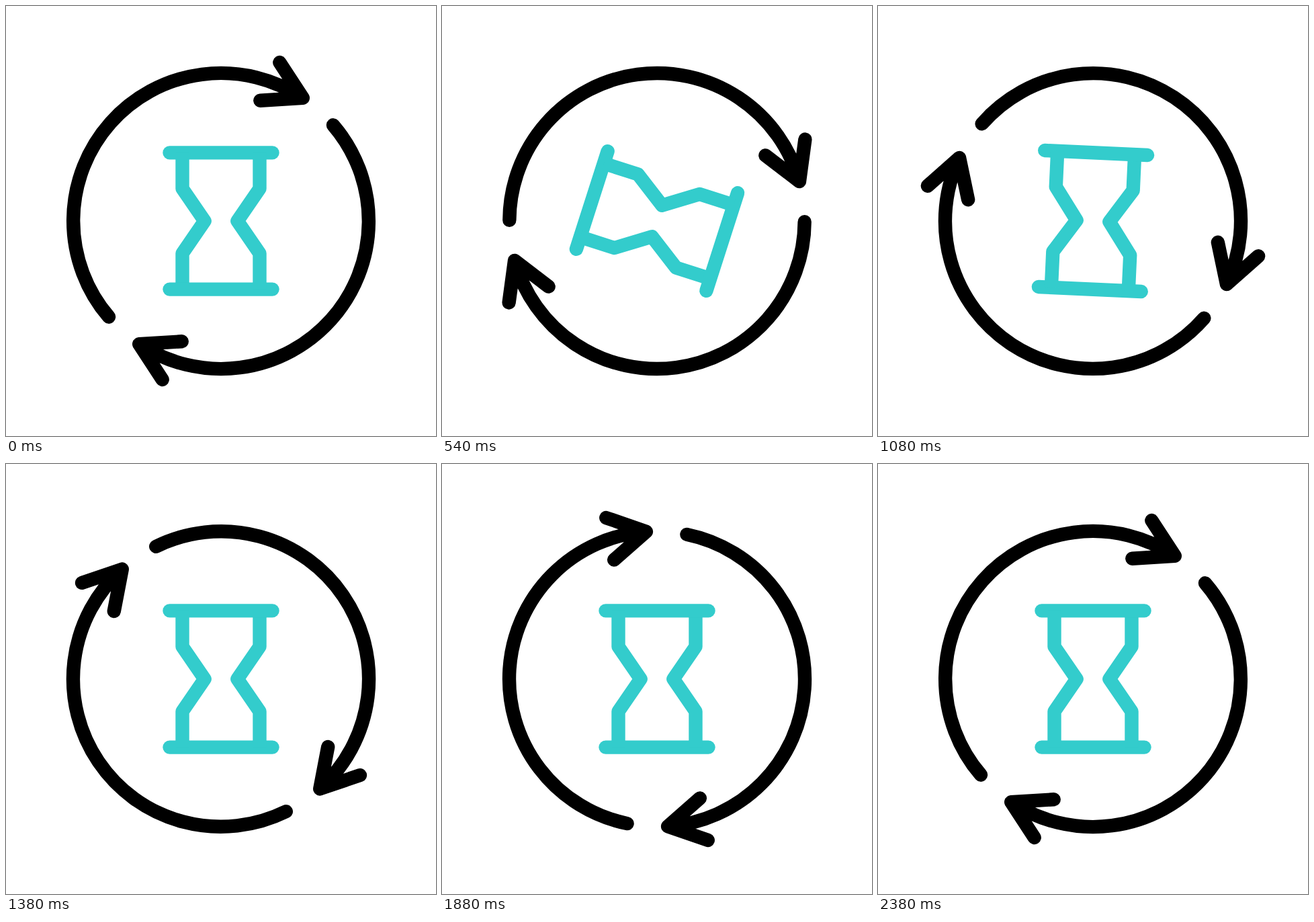
Animation, 640 px wide and 640 px high, one loop 2.4 s. Source, as an HTML page:

```html
<!DOCTYPE html>
<html lang="en">
<head>
<meta charset="utf-8">
<title>Hourglass cycle</title>
<style>
  html, body { margin: 0; width: 100%; height: 100%; overflow: hidden; background: #fff; }
  svg { display: block; width: 100%; height: 100%; }
  g { fill: none; stroke-width: 20.4; stroke-linecap: round; stroke-linejoin: round; }
  #ring { stroke: #000; }
  #glass { stroke: #3cc; }
  .wall { stroke-linecap: butt; }
</style>
</head>
<body>
<svg viewBox="-320 -320 640 640">
  <defs>
    <path id="arrow" d="M-167 142.7A219.8 219.8 0 0 1 121.8 -183.2M87.3 -236L121.8 -183.2L58.3 -179.3"/>
    <path id="half" d="M-76.5 -101.6H76.5"/>
    <path id="wall" class="wall" d="M-57.5 -101.6V-48.2L-24.4 0L-57.5 48.2V101.6"/>
  </defs>
  <g id="ring">
    <use href="#arrow"/>
    <use href="#arrow" transform="rotate(180)"/>
  </g>
  <g id="glass">
    <use href="#half"/>
    <use href="#wall"/>
    <use href="#half" transform="rotate(180)"/>
    <use href="#wall" transform="rotate(180)"/>
  </g>
</svg>
<script>
  const LOOP = 2400, STEP = 20, FLIP = 1200;
  const ring = document.getElementById('ring');
  const glass = document.getElementById('glass');
  const start = performance.now();

  // cubic-bezier(.5, 0, .5, 1)
  function ease(x) {
    if (x >= 1) return 1;
    let lo = 0, hi = 1;
    for (let i = 0; i < 30; i++) {
      const s = (lo + hi) / 2;
      if (1.5 * s * (1 - s) + s ** 3 < x) lo = s; else hi = s;
    }
    return lo * lo * (3 - 2 * lo);
  }

  const turn = (el, deg) => el.setAttribute('transform', `rotate(${deg})`);

  function draw() {
    const elapsed = performance.now() - start;
    const t = Math.floor((elapsed + 0.5) / STEP) * STEP % LOOP;
    turn(ring, 180 * t / (LOOP - STEP));
    turn(glass, -180 * ease(t / FLIP));
    requestAnimationFrame(draw);
  }
  draw();
</script>
</body>
</html>
```
